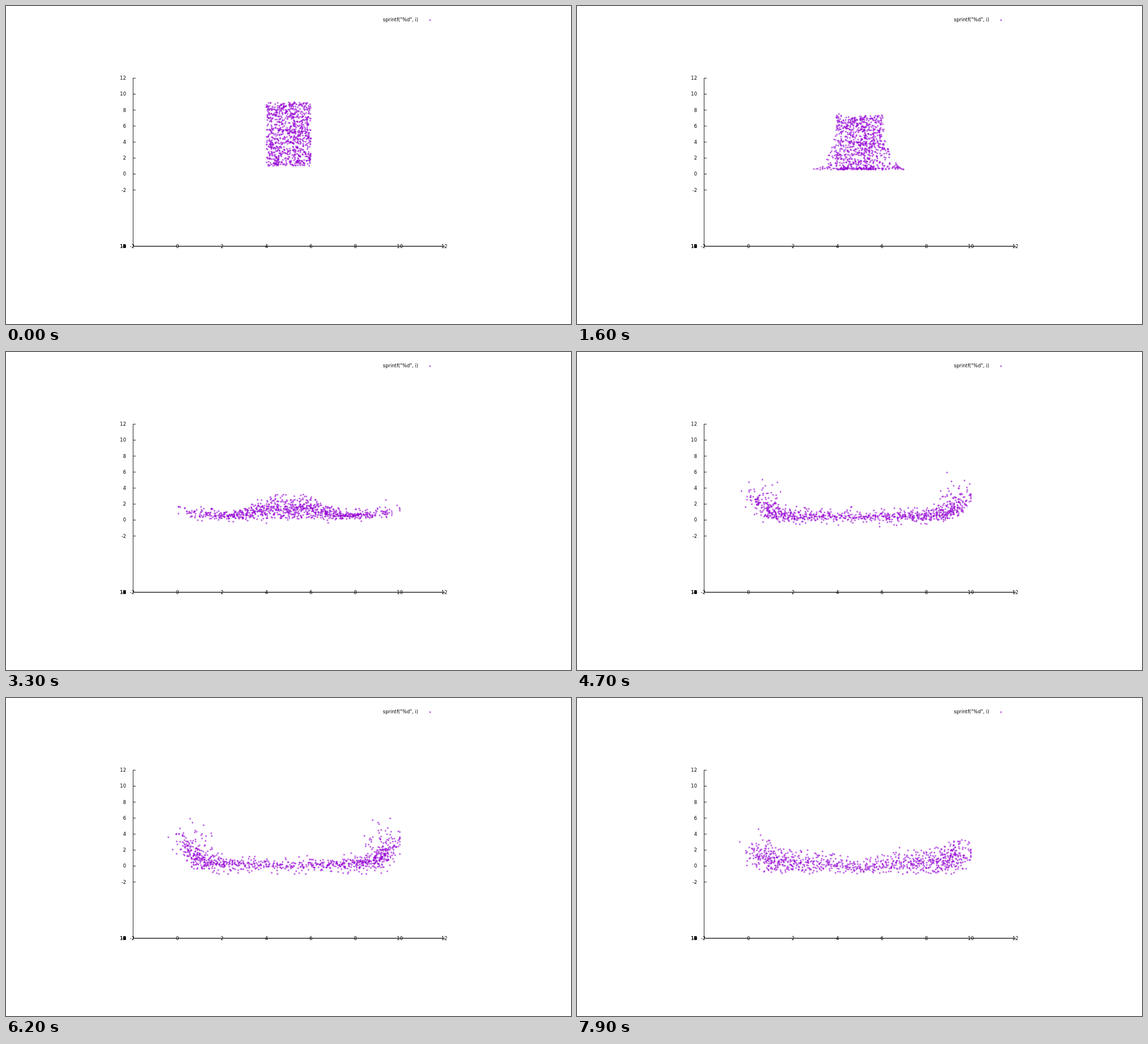
Recreate the animation shown at these times as an HTML page with a canvas. Size 998 by 561 pixels, loop 8 s.

```html
<!DOCTYPE html>
<html>
<head>
<meta charset="utf-8">
<style>
html, body { margin: 0; width: 100%; height: 100%; overflow: hidden; background: #fff; }
canvas { display: block; }
</style>
</head>
<body>
<canvas id="stage" width="998" height="561"></canvas>
<script>
const ctx = document.getElementById('stage').getContext('2d');
const LOOP = 8000, STEP = 100, COUNT = 920, BIN = 20, ARM = 1.8;
const px = x => 303 + 39.27 * x;
const py = y => 296.4 - 14.1 * y;

let seed = 20;
function rand() {
  seed = (seed + 0x6D2B79F5) | 0;
  let t = Math.imul(seed ^ (seed >>> 15), 1 | seed);
  t = (t + Math.imul(t ^ (t >>> 7), 61 | t)) ^ t;
  return ((t ^ (t >>> 14)) >>> 0) / 4294967296;
}
const jitter = size => size * (2 * rand() - 1);
const outlier = size => size * (2 * rand() - 1) ** 5;
const clamp = (v, lo, hi) => Math.min(hi, Math.max(lo, v));

// Free fall onto a soft floor; low outer points are squeezed outwards
function column(p, t) {
  const floor = 1 - .25 * t, soft = .25;
  const dip = .18 * t * t * (1 - p.a ** 6) * (p.v - 1) / 8;
  const drop = p.v - .5 * t * t - dip - floor;
  const spread = .38 * t ** 2.7 * Math.exp((1 - p.v) / (1 + .75 * t));
  return {
    d: p.a + spread * p.a ** 3,
    y: t ? floor + soft * Math.log1p(Math.exp(drop / soft)) : p.v
  };
}

// Spreading pool: middle hump, slosh away from the middle, run-up at the walls
const stages = [
  { t: 3.3, pack: .7, floor: .2, top: .8, hump: 2.4, slosh: 0, wall: 1.2 },
  { t: 4.7, pack: 2, floor: 0, top: 1, hump: 0, slosh: 0, wall: 3.4 },
  { t: 6.2, pack: 2.4, floor: -.3, top: .4, hump: 0, slosh: .6, wall: 4 },
  { t: 7.9, pack: 1.85, floor: -.8, top: .3, hump: 0, slosh: 2.3, wall: 1.6 }
];

function pool(p, k) {
  let d = 4.3 * (1 - (1 - p.q) ** k.pack) + p.q ** 6 * p.reach + jitter(.12);
  const w = Math.min(1.1, (d / 4.8) ** 6);
  const lo = k.floor + .4 * k.wall * w * w;
  const hi = k.top + k.hump * Math.exp(-(((d - .6) / 1.2) ** 2))
    + k.slosh * d / (d + 1) + k.wall * w;
  const c = 2 * p.r - 1;
  let y = lo + (hi - lo) * (.5 + (c + c ** 3) / 4) ** 1.2;
  y += jitter(.1) + outlier(.3 + .2 * k.wall);
  if (p.stray && p.q > .8) {
    d -= .3 * k.wall * p.drift;
    y += .5 * k.wall * p.lift;
  }
  return { d, y };
}

const falls = [0, .8, 1.6, 2.4];
const times = [...falls, ...stages.map(k => k.t)];

const points = Array.from({ length: COUNT }, () => {
  const u = jitter(1);
  return {
    side: Math.sign(u), a: Math.abs(u), v: 1 + 8 * rand(), path: [],
    stray: rand() < .3, drift: rand(), lift: rand(), reach: .4 + .9 * rand() ** 2
  };
});

function addKey(p, { d, y }) {
  p.path.push([clamp(5 + p.side * d, -1, 10), Math.max(-1, y)]);
}

for (const p of points) {
  for (const t of falls) {
    const spot = column(p, t);
    spot.y += jitter(.06 * t);
    Object.assign(p, spot);
    addKey(p, spot);
  }
}

// Rank each half outwards, then by height among neighbours
for (const side of [-1, 1]) {
  const half = points.filter(p => p.side === side).sort((a, b) => a.d - b.d);
  half.forEach((p, i) => p.q = (i + rand()) / half.length);
  for (let i = 0; i < half.length; i += BIN) {
    const bin = half.slice(i, i + BIN).sort((a, b) => a.y - b.y);
    bin.forEach((p, j) => p.r = (j + rand()) / bin.length);
  }
}

for (const p of points) for (const k of stages) addKey(p, pool(p, k));

// Smooth path through the key positions, starting at rest
function place(path, i, t, axis) {
  const slope = n => {
    if (n === 0) return 0;
    const b = Math.min(n + 1, times.length - 1);
    return (path[b][axis] - path[n - 1][axis]) / (times[b] - times[n - 1]);
  };
  const span = times[i + 1] - times[i], s = (t - times[i]) / span;
  const s2 = s * s, s3 = s2 * s;
  return (2 * s3 - 3 * s2 + 1) * path[i][axis] + (3 * s2 - 2 * s3) * path[i + 1][axis]
    + span * ((s3 - 2 * s2 + s) * slope(i) + (s3 - s2) * slope(i + 1));
}

function line(x0, y0, x1, y1, width) {
  ctx.lineWidth = width;
  ctx.beginPath();
  ctx.moveTo(x0, y0);
  ctx.lineTo(x1, y1);
  ctx.stroke();
}

function plus(x, y) {
  line(x - ARM, y, x + ARM, y, .68);
  line(x, y - ARM, x, y + ARM, .68);
}

function label(text, x, y, align) {
  ctx.textAlign = align;
  ctx.fillText(text, x, y);
}

function drawAxes() {
  ctx.strokeStyle = ctx.fillStyle = '#000';
  ctx.font = '8.4px "DejaVu Sans", sans-serif';
  line(224.5, 127, 224.5, 424, .85);
  line(224, 423.8, 775, 423.8, 1.3);
  for (let n = -2; n <= 12; n += 2) {
    line(224.5, py(n) + .1, 229, py(n) + .1, .85);
    label(n, 212, py(n) + 3, 'right');
    label(n, 212, 427, 'right');
    label(n, px(n) - (n < 0 ? 1.5 : 0), 426.5, 'center');
  }
  label('sprintf("%d", i)', 728, 27.3, 'right');
}

function draw(now) {
  const t = Math.floor((now % LOOP) / STEP) * STEP / 1000;
  let i = 0;
  while (i < times.length - 2 && t >= times[i + 1]) i++;
  ctx.fillStyle = '#fff';
  ctx.fillRect(0, 0, 998, 561);
  drawAxes();
  ctx.strokeStyle = '#9400d3';
  for (const p of points) {
    const x = clamp(place(p.path, i, t, 0), -1, 10);
    const y = Math.max(-1, place(p.path, i, t, 1));
    plus(px(x), py(y));
  }
  plus(749, 25);
}

const start = performance.now();
function tick() {
  draw(performance.now() - start);
  requestAnimationFrame(tick);
}
tick();
</script>
</body>
</html>
```
